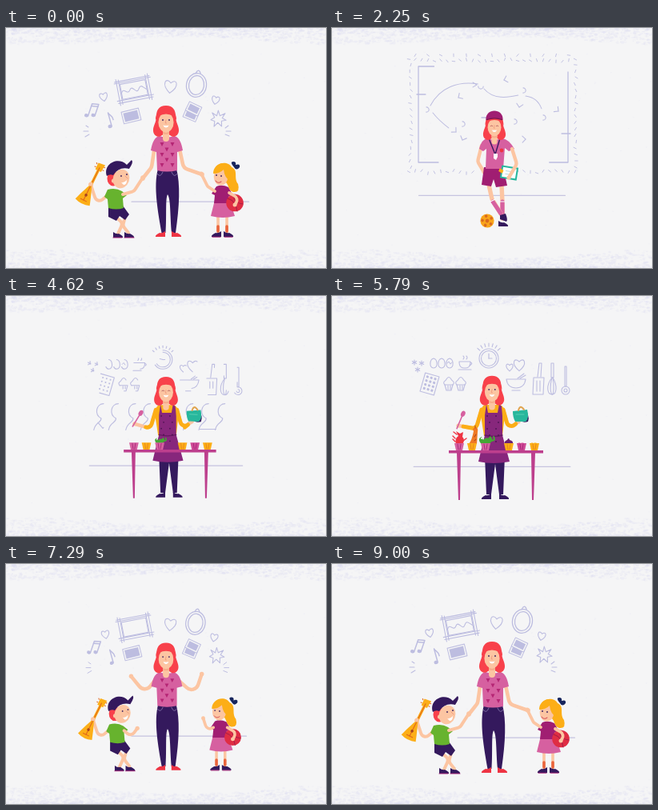
An HTML page with a canvas that plays this animation: 400x300 px, repeating every 9030 ms.

```html
<!DOCTYPE html>
<html lang="en">
<head>
<meta charset="utf-8">
<title>A busy mother</title>
<style>
html, body { margin: 0; width: 100%; height: 100%; overflow: hidden; background: #f5f5f6; }
canvas { display: block; width: 400px; height: 300px; }
</style>
</head>
<body>
<canvas id="stage"></canvas>
<script>
const LOOP = 9030, CUTS = [450, 2400, 4500, 6550];
const INK = '#bdbde0', SKIN = '#fcc5a2', HAIR = '#f8414b', NAVY = '#34195d', PINK = '#d660a0',
  PLUM = '#a01e72', RED = '#ee3343', GOLD = '#fcae17', TEAL = '#27b79c', BG = '#f5f5f6', WHITE = '#fff';
const dpr = window.devicePixelRatio || 1;
const stage = document.getElementById('stage');
const g = stage.getContext('2d');
stage.width = 400 * dpr;
stage.height = 300 * dpr;

const ease = (t, a, b) => { const k = Math.min(1, Math.max(0, (t - a) / (b - a))); return k * k * (3 - 2 * k); };
const span = (t, a, b, c, d) => ease(t, a, b) * (1 - ease(t, c, d));
const mix = (a, b, k) => a + (b - a) * k;
const mixPts = (a, b, k) => a.map((p, i) => [mix(p[0], b[i][0], k), mix(p[1], b[i][1], k)]);
const seeded = s => () => (s = s * 16807 % 2147483647) / 2147483647;

function at(x, y, s, rot, draw) {
  g.save();
  g.translate(x, y);
  g.rotate(rot);
  g.scale(s, s);
  draw();
  g.restore();
}
function fill(d, color) { g.fillStyle = color; g.fill(new Path2D(d)); }
function dot(x, y, rx, color, ry = rx) {
  g.fillStyle = color;
  g.beginPath();
  g.ellipse(x, y, rx, ry, 0, 0, 7);
  g.fill();
}

// Strokes every subpath up to the fraction p of its length.
const probe = document.createElementNS('http://www.w3.org/2000/svg', 'path');
const cache = {};
function line(d, color = INK, w = 1, p = 1) {
  if (p <= 0) return;
  cache[d] ||= d.match(/M[^M]+/g).map(s => {
    probe.setAttribute('d', s);
    return [new Path2D(s), probe.getTotalLength()];
  });
  g.strokeStyle = color;
  g.lineWidth = w;
  for (const [path, len] of cache[d]) {
    g.setLineDash(p < 1 ? [len * p, len + 9] : []);
    g.stroke(path);
  }
  g.setLineDash([]);
}
const icon = (d, x, y, p, s = 1, rot = 0) => at(x, y, s, rot, () => line(d, INK, 1.1 / s, p));

function limb(pts, color, w, hand, bend = 6) {
  const [a, b, c] = pts;
  g.strokeStyle = color;
  g.lineWidth = w;
  g.beginPath();
  g.moveTo(...a);
  g.arcTo(...b, ...c, bend);
  g.lineTo(...c);
  g.stroke();
  if (hand) dot(...c, hand, color);
}

const HEART = 'M0 8C-12-2-6-11 0-4C6-11 12-2 0 8';
const CROSS = 'M-4-4L0 0L4 4M4-4L0 0L-4 4';
const RING = 'M0-3.5A3.5 3.5 0 1 1 0 3.5A3.5 3.5 0 1 1 0-3.5';
const STAR = 'M0-11L2-4L9-7L5-1L10 2L4 3L4 10L-1 5L-6 10L-5 3L-10 1L-5-2L-8-8L-2-4Z';
const SPARK = 'M0-4V4M-3.5-2L3.5 2M-3.5 2L3.5-2';

function note(x, y, s, rot, p, pair) {
  if (p <= 0) return;
  at(x, y, s, rot, () => {
    line(pair ? 'M-2 8V-8L6-10V5M-2-5L6-7' : 'M1 8V-9C2-5 6-4 5 1', INK, 1.5, p);
    if (p < .3) return;
    dot(pair ? -4 : -1, 8, 2.6, INK, 2.2);
    if (pair) dot(4, 5, 2.6, INK, 2.2);
  });
}

function head(x, y, s, shut, cap) {
  at(x, y, s, 0, () => {
    fill('M0-17C-9-17-12-11-12-4C-12 4-16 8-16 14C-16 21-9 24-5 20L0 18L5 20C9 24 16 21 16 14C16 8 12 4 12-4C12-11 9-17 0-17Z', HAIR);
    limb([[0, 9], [0, 15], [0, 24]], SKIN, 8);
    fill('M-4 15Q0 18 4 15V18Q0 20-4 18Z', '#f6ad8c');
    dot(0, 4, 9.6, SKIN, 12.5);
    fill('M-13 1L-9-4Q0-9 9-4L13 1C14-18-14-18-13 1Z', HAIR);
    if (shut) line('M-5.5 2Q-4 .5-2.5 2M2.5 2Q4 .5 5.5 2', '#a44b50', .8);
    else { dot(-4, 1, .9, NAVY); dot(4, 1, .9, NAVY); }
    line('M0 1L-.8 5H.5', '#ed9478', .8);
    fill('M-3.5 7.5Q0 8.5 3.5 7.5Q2.5 10.5 0 10.5T-3.5 7.5Z', WHITE);
    if (cap) {
      fill('M-12-7C-13-24 13-24 12-7Q0-11-12-7Z', PLUM);
      line('M-11-7Q0-11 11-7', '#711551', 1.5);
    }
  });
}
const shoe = (x, y, dir, color) => at(x, y, 1, 0, () =>
  fill(`M${-4 * dir}-5Q0-2 ${3 * dir}-3Q${9 * dir} 0 ${8 * dir} 2H${-4 * dir}Z`, color));

// Slow push-in, pulled back quickly before the sports scene.
const push = t => 1 + 1.95e-5 * (t - 2250);
const zoomAt = t => t < 450 ? mix(push(t + LOOP), push(450), ease(t, 120, 450)) : push(t);
const zoomed = (t, ref, draw) => at(200, 150, zoomAt(t) / push(ref), 0, () => { g.translate(-200, -150); draw(); });

function familyArt(u) {
  const p = span(u, 6600, 7100, 9150, 9450);
  if (!p) return;
  const sway = Math.sin(u / 400) * .04;
  note(107, 103, 1, .35 + sway, p, true);
  note(129, 115, 1, -.25 + sway, p);
  icon(HEART, 122, 86, p, .7, -.2);
  icon(HEART, 205.5, 73, p, 1.05, .12);
  icon(HEART, 262, 90, p, .68, .2);
  icon(STAR, 265.5, 113.5, p, .95, sway);
  at(160, 77.5, 1, -.19, () => {
    line('M-22-14H22M-22 13H22M-20-17V16M20-17V16M-16-10H16V9H-16ZM-23-12H23M-23 10H23M-17-16V15M17-16V15', INK, 1.1, p);
    line('M-16 1C-12-7-9 6-5-1S2 7 6 0S12 0 16 2', INK, 1.1, ease(u, 7500, 8100) * p);
  });
  at(238, 71.5, 1, .15, () => line('M0-15A12.5 15 0 1 1 0 15A12.5 15 0 1 1 0-15M0-12A9.5 12 0 1 1 0 12A9.5 12 0 1 1 0-12M-3-15Q0-22 3-15', INK, 1.3, p));
  const photo = (x, y, w, h, rot) => at(x, y, p, rot, () => {
    g.fillStyle = BG;
    g.fillRect(-w / 2, -h / 2, w, h);
    line(`M${-w / 2} ${-h / 2}h${w}v${h}h${-w}Z`);
    g.fillStyle = INK;
    g.fillRect(-w / 2 + 2, -h / 2 + 2, w - 4, h - 4);
  });
  photo(156.5, 110, 22, 15, -.24);
  photo(231, 109, 17, 11, .4);
  photo(234.5, 101, 17, 12, .45);
  line('M103 124L100 122M103 129H97M104 133L99 136M274 125L278 122M275 129H281M274 133L279 135', INK, 1, p);
}

function kids(u, hold, wave) {
  const k = span(u, 6550, 6850, 9150, 9440);
  if (!k) return;
  at(145, 262, k, 0, () => {
    g.translate(-145, -262);
    limb([[137, 236], [146, 244], [140, 257]], SKIN, 4);
    limb([[149, 236], [146, 247], [153, 256]], SKIN, 4);
    shoe(138, 260, 1, NAVY);
    shoe(152, 260, 1, NAVY);
    line('M134 262H145M148 262H160', PLUM, 1);
    fill('M128 223L146 222L154 233L149 240L142 235L138 241L128 236Z', NAVY);
    limb([[127, 209], [114, 220], [106, 196]], SKIN, 4, 2.8);
    at(101, 207, 1, .46, () => {
      line('M0-12V-32', GOLD, 3.4);
      fill('M-4-41L5-42L4-32H-4Z', GOLD);
      fill('M0-14C4-6 8 6 10 12Q0 16-10 12C-8 6-4-6 0-14Z', GOLD);
      line('M0-36V9M-4 9H4M-5-39L-6-40M-5-35H-6M5-39H6M5-35H6', '#e0661c', 1.1);
      dot(0, 2, 1.8, '#a8431f');
    });
    dot(106, 195, 2.6, SKIN);
    fill('M127 202Q137 199 145 204L151 209L146 213L147 225Q138 228 128 225L127 214L123 211Z', '#67b32e');
    limb(mixPts([[146, 210], [155, 218], [164 + wave, 207]], [[146, 208], [160, 204], [171, 187]], hold), SKIN, 4, 2.7);
    dot(134, 188, 7.5, HAIR, 9.5);
    at(144, 188.5, 1, .35, () => dot(0, 0, 10.2, SKIN, 12));
    dot(134.5, 191, 2.6, SKIN);
    dot(144, 185, .9, NAVY);
    dot(151, 183, .9, NAVY);
    line('M149 185L152 188', '#ed9478', .8);
    fill('M144 193Q148 194 151 190Q151 196 147 196Z', WHITE);
    fill('M126 185C121 170 140 160 151 171L157 165Q160 167 154 176Q141 173 134 184Q130 182 126 185Z', NAVY);
  });
  at(268, 262, k, 0, () => {
    g.translate(-268, -262);
    for (const [x, dir] of [[265, -1], [276, 1]]) {
      limb([[x, 232], [x, 242], [x, 255]], SKIN, 3.6);
      line(`M${x} 248V254`, '#e9643d', 3.6);
      shoe(x, 259, dir, NAVY);
    }
    line('M258 261.2H268M273 261.2H283', PLUM, 1);
    fill('M261 215H279L286 235Q271 239 256 235Z', PINK);
    fill('M263 198Q270 195 278 199L283 208L278 211L280 219H260L261 209L257 207Z', PLUM);
    limb(mixPts([[261, 206], [253, 210], [247 - wave, 194]], [[261, 204], [252, 198], [244, 182]], hold), SKIN, 3.8, 2.5);
    dot(286, 218.5, 10.8, '#df2d44');
    line('M277 213Q287 216 289 229M286 208Q282 218 296 220', '#a51e45', 1);
    limb([[279, 206], [291, 213], [286, 221]], SKIN, 3.8, 2.5);
    fill('M262 178C262 167 278 166 282 174C291 178 284 187 290 195Q293 206 284 205C277 203 279 196 274 192Z', GOLD);
    dot(268.5, 186, 8.8, SKIN, 10.8);
    fill('M259 182C259 170 273 164 281 175L280 191Q273 187 272 177Q267 182 259 182Z', GOLD);
    dot(263, 184, .9, NAVY);
    dot(269, 185, .9, NAVY);
    dot(274, 189, 1.9, SKIN);
    line('M262 191Q265 195 269 192', '#d65258', 1);
    fill('M285 174Q279 167 284 167Q288 167 287 171Q293 169 292 174Q288 179 285 174Z', '#17255d');
  });
}

function family(u, shut) {
  const hold = ease(u, 7700, 8150), wave = Math.sin(u / 110) * 3 * (1 - hold);
  kids(u, hold, wave);
  fill('M190 176H213C218 195 217 222 212 256H207C205 235 206 213 202 208C199 213 201 235 199.5 256H194.5C190 230 184 198 190 176Z', NAVY);
  line('M189 182Q193 188 196 180M207 180Q210 188 214 182', '#8c7bb0', .8);
  shoe(195, 259, -1, RED);
  shoe(211, 259, 1, RED);
  const arm = ease(u, 6550, 6850);
  const left = mixPts([[185, 146], [180, 170], [182, 190]], [[185, 146], [173, 162], [156 + wave, 140]], arm);
  const right = mixPts([[217, 146], [222, 170], [220, 190]], [[217, 146], [237, 164], [247 + wave, 137]], arm);
  limb(mixPts(left, [[186, 147], [182, 174], [171, 188]], hold), SKIN, 4.6, 2.8, 9);
  limb(mixPts(right, [[216, 147], [222, 175], [245, 183]], hold), SKIN, 4.6, 2.8, 9);
  fill('M192 135Q201 138 210 135Q218 136 221 153L214 155L214 178Q201 181 189 178L188 155L181 153Q184 136 192 135Z', PINK);
  for (let i = 0; i < 5; i++)
    for (const x of i % 2 ? [201] : [195, 208]) fill(`M${x - 2.5} ${143 + i * 6.5}h5l-2.5 5Z`, '#b52574');
  head(200, 114, 1, shut);
}

function fieldArt(t) {
  const p = span(t, 500, 950, 2080, 2420), rnd = seeded(31);
  if (!p) return;
  line('M133 168H108V48H295M295 55V168H133M106 83H128M298 132H276M187 112H203', INK, 1.3, p);
  line('M123 97C135 74 158 66 183 70M190 76C202 90 220 87 233 84M242 85Q257 87 262 101M126 106Q134 116 146 125M176 68L181 71L176 74', INK, 1, Math.min(1, p * 2));
  const marks = [[215, 65, 1.3], [158, 87, 1], [283, 104, -.9], [242, 139, -1.6], [163, 140, .4], [234, 99, .2], [155, 130, -.8]];
  for (const [x, y, r] of marks) icon(CROSS, x, y, p, 1, r);
  const rings = [[118, 102], [186, 73], [239, 78], [163, 120], [228, 117], [264, 112]];
  rings.forEach(([x, y], i) => icon(RING, x, y, p, .9, i === 1 ? 1.57 : 0));
  const tick = (x, y) => {
    const a = rnd() * 2.4, l = 1.8 * Math.min(1, p * 2);
    line(`M${x - l * Math.cos(a)} ${y - l * Math.sin(a)}L${x + l * Math.cos(a)} ${y + l * Math.sin(a)}`, INK, .9);
  };
  for (let i = 0; i < 27; i++) {
    const x = 96 + i * 8;
    tick(x, 39 + rnd() * 3);
    if (i & 1) tick(x, 34);
    if (Math.abs(x - 202) > 22) tick(x, 178 + rnd() * 4);
    if (i < 17) { tick(97 + rnd() * 3, 46 + x - 96); tick(303 + rnd() * 3, 46 + x - 96); }
  }
}

function coach(t, shut) {
  const roll = ease(t, 480, 1050);
  at(mix(130, 194, roll), 241 - Math.abs(Math.sin(roll * 9.42)) * 8 * (1 - roll), 1, roll * 7, () => {
    dot(0, 0, 8.6, '#f9a51b');
    for (let i = 0; i < 5; i++) dot(6 * Math.cos(i * 1.257), 6 * Math.sin(i * 1.257), 1.8, '#d86920');
    dot(0, 0, 2.3, '#d86920');
  });
  limb([[212, 196], [213, 218], [213, 238]], SKIN, 5.4);
  line('M213 217V237', PINK, 5.2);
  limb([[196, 196], [200, 214], [211, 232]], SKIN, 5.4);
  line('M201 217L211 232', PINK, 5);
  line('M198 217L204 214M210 217H216', WHITE, 1);
  fill('M210 234L217 232Q220 240 218 242L210 239Z', NAVY);
  shoe(212, 246, 1, NAVY);
  const a = ease(t, 450, 800);
  limb(mixPts([[187, 147], [183, 166], [184, 183]], [[187, 147], [182, 167], [190, 180]], a), SKIN, 4.4, 2.5);
  fill('M190 174H214L219 197L205 199L202 189L199 198L187 196Z', PLUM);
  fill('M194 138Q203 141 213 138Q221 139 228 151L221 154L216 150L214 176H192L193 151L189 154L184 151Q187 139 194 138Z', PINK);
  line('M196 138L204 158L210 138', NAVY, 1.3);
  fill('M202 157H207V161L205 165L202 163Z', WHITE);
  dot(212, 153, 2.4, RED);
  at(221, 181, a, .16, () => {
    fill('M-10-8H11V8H-10Z', TEAL);
    fill('M-8-6H9V6H-8Z', WHITE);
    line('M-4-2H6M-4 2H4', '#bad9dc', 1);
    fill('M-12-4L-7-2L-8 2L-13 0Z', GOLD);
  });
  limb(mixPts([[224, 150], [228, 166], [222, 184]], [[225, 151], [231, 170], [221, 187]], a), SKIN, 4.4, 2.6);
  head(203, 120.5 + Math.sin(t / 260) * .4, .88, shut, true);
}

function musicArt(t) {
  const p = span(t, 2450, 2900, 4150, 4450), q = span(t, 2450, 2950, 4420, 4820);
  const bob = i => Math.sin((t - 3300) / 180 + i * 2) * 1.2;
  const notes = [[168, 86, .2], [184, 96, 0], [145, 102, .15], [239, 90, -.2], [249, 110, .1]];
  notes.forEach(([x, y, r], i) => note(x, y + bob(i), .85, r, p));
  note(213, 88 + bob(5), 1, .3, p, true);
  note(264, 83 + bob(6), .85, .1, p, true);
  icon('M0 12C4 14 4 8 2 4L-1-8C-1-14 4-12 2-8C0-4-5-1-5 3C-5 8 4 8 4 3C4-1-2-1-1 4', 127, 90, p);
  icon('M-1-4L-2 4M2-4L1 4M-4-1H4M-4 2H4', 144, 82, p);
  [[197, 83, 1.2], [225, 107, 1], [266, 101, 1.1], [249, 77, .8]].forEach(([x, y, s]) => icon(SPARK, x, y, p, s));
  for (let i = 0; i < 10; i++) at(165, 106, 1, i * .628, () => line('M0-5V-7', INK, 1, p));
  for (const x of [124, 142, 163, 181, 233, 252, 272])
    icon('M-12 25C-10 15-3 17-3 11C-12 6-9-7 0-7C9-7 12 6 3 11C3 17 10 15 12 25', x, 142, q);
  line('M117 158L123 165L131 156M241 166H281', INK, 1, q);
}

function singer(t, shut) {
  const a = ease(t, 2400, 2750), bob = Math.sin((t - 3300) / 180) * a;
  limb([[196, 202], [196, 225], [195, 246]], SKIN, 5.2);
  limb([[209, 202], [210, 225], [211, 246]], SKIN, 5.2);
  shoe(195, 250, -1, NAVY);
  shoe(212, 250, 1, NAVY);
  limb(mixPts([[188, 145], [184, 162], [186, 182]], [[189, 146], [172, 151], [168, 134 + bob]], a), SKIN, 4.4, 2.6);
  at(173, 129 + bob, a, 0, () => {
    fill('M-5-5H9V4H-5Z', NAVY);
    fill('M-10-3H-4V2H-10Z', '#4c3b78');
    line('M-4 4Q2 8 6 4', SKIN, 3);
    dot(-1, 0, 2, '#a7a0c8');
  });
  fill('M190 174H213L219 204Q202 207 184 204Z', NAVY);
  limb(mixPts([[213, 146], [217, 164], [215, 182]], [[213, 146], [218, 168], [230, 159 + bob]], a), SKIN, 4.4, 2.6);
  fill('M191 137H211Q216 138 217 148L213 151V176H190V151L186 148Q186 139 191 137Z', PINK);
  for (let y = 146; y < 174; y += 7) { dot(201, y, .8, PLUM); dot(195, y + 2, .6, '#a03b84'); dot(208, y + 2, .6, '#a03b84'); }
  line('M207 140Q194 139 191 150L188 178', NAVY, 1.5);
  fill('M184 176L192 175L193 191L184 192Z', '#f2681f');
  line('M184 181H193', '#b93d18', 1);
  at(231, 147 + bob, a, .16, () => {
    fill('M-9-10L6-11V12L-9 11Z', GOLD);
    fill('M6-11L10-16L11 7L6 12Z', '#ee8f18');
    line('M-5-3H2M-5 0H2M-3 6V1L2 0V5', '#c66b16', 1);
  });
  dot(228, 160 + bob, 2.5, SKIN);
  head(199, 119 + bob * .4, .9, shut);
  fill('M201 138L194 136L192 143L198 146ZM201 138L208 136L210 143L204 146Z', WHITE);
}

function kitchenArt(t) {
  const p = span(t, 4350, 4800, 6250, 6590);
  if (!p) return;
  [[103, 83], [112, 84], [107, 92]].forEach(([x, y]) => icon(SPARK, x, y, p, .75));
  for (const x of [127, 137, 147]) icon('M0-6C5-5 6 6 0 6S-5-5 0-6', x, 84, p);
  line('M144 84L146 82L148 85L150 83', INK, 1, p);
  icon('M-7-3H7C7 4 4 5 0 5S-7 4-7-3M7-2Q11-1 6 2M-8 7H8M-2-6Q0-8-2-10M2-6Q4-8 2-10', 166, 85, p);
  icon('M0-12A12 12 0 1 1 0 12A12 12 0 1 1 0-12M0-9.5A9.5 9.5 0 1 1 0 9.5A9.5 9.5 0 1 1 0-9.5', 196, 78, p);
  at(196, 78, 1, 0, () => {
    const a = (t - 5790) / 900;
    line('M0 0H4', INK, 1.2, p);
    line(`M0 0L${6 * Math.sin(a)} ${-6 * Math.cos(a)}`, INK, 1.2, p);
  });
  for (let i = -3; i < 4; i++) at(196, 78, 1, i * .28, () => line('M0-15V-19', INK, 1.1, p));
  icon(HEART, 222, 89, p, .6);
  icon(HEART, 234, 86, p, .95);
  icon('M-12-3H12C11 5 7 8 0 8S-11 5-12-3M-5 11H5M2-4L10-10M5-4L12-8', 230, 107, p);
  icon('M-6-1H7L6 20H-7ZM-2 3V16M2 3V16M-1-2L1-19H4L3-2', 258, 103, p);
  icon('M-1-20H2V-2H-1ZM0-2C-8 8-6 19 0 19S7 8 1-2M0-2C-3 8-2 17 0 19S3 8 1-2', 275, 104, p);
  icon('M-1-17H1V8H-1ZM0 8A5 5 0 1 1 0 18A5 5 0 1 1 0 8M0 11A2 2 0 1 1 0 15A2 2 0 1 1 0 11', 292, 105, p);
  at(122, 110, 1, .28, () => {
    line('M-9-12H9V12H-9Z', INK, 1.1, p);
    for (let i = 0; i < 12; i++) dot(-5 + i % 3 * 5, -8 + (i / 3 | 0) * 5, 1.6 * p, INK);
  });
  for (const x of [146, 161])
    icon('M-5 1H5L3 8H-3ZM-5 1C-9-3-3-4-3-6Q0-11 3-6C3-4 9-3 5 1M-1 2V7M2 2V7', x, 110, p);
}

const TOPS = [
  () => { fill('M-4 0Q-6-7-1-10L-4-16L1-13L5-15L4-9Q8-5 4 0Z', RED); line('M-5-3L-8-6M-5-7L-8-10M5-4L9-7M-3-12L-7-15', RED, 1.4); },
  () => { fill('M-4 0Q0-5 2-16Q-1-20 5-21Q8-20 7-15L6 0Z', '#ef7a24'); line('M4-20V-23M5-12L3-9M5-6L3-4', '#ad421b', 1); },
  () => { fill('M-7-2Q-10-7-5-9L-3-5Q0-9 3-7L6-10L9-5L5 0H-5Z', '#46a735'); dot(-5, -7, 1, WHITE); line('M7-4Q13-4 10-9', '#46a735', 2); },
  () => fill('M-5 0Q-6-4-2-5Q0-9 1-5Q6-4 5 0Z', '#6b2172'),
  () => fill('M-5 0Q-4-3-1-1Q1-3 5 0Z', '#df6aa4'),
  () => fill('M-5 0Q-4-3-1-1Q1-3 5 0Z', '#fbc13a')
];
const READY = [5000, 4700, 4350, 5100, 4500, 4500];

function cook(t, shut) {
  const a = ease(t, 4420, 4600), beat = Math.cos((t - 4620) / 372), sleeve = mix(.25, .72, ease(t, 4650, 4850));
  fill('M191 200H216L214 248H209L204 210L199 248H193Z', NAVY);
  shoe(195, 252, -1, NAVY);
  shoe(213, 252, 1, NAVY);
  const left = mixPts([[187, 143], [182, 162], [184, 180]], [[187, 142], [180, 166], [159 + beat, 161 - beat]], a);
  const right = mixPts([[214, 143], [219, 162], [216, 180]], [[214, 142], [221, 167], [233, 157]], a);
  for (const [shoulder, elbow, hand] of [left, right]) {
    limb([shoulder, elbow, hand], SKIN, 4.6, 2.6);
    limb([shoulder, elbow, mixPts([elbow], [hand], sleeve)[0]], GOLD, 5);
  }
  fill('M191 136H210Q216 138 216 149L213 175H190L186 149Q186 138 191 136Z', GOLD);
  fill('M193 135L195 146H207L209 135L212 138L213 150V174L222 207Q202 211 183 207L191 174V149Z', '#87277c');
  line('M191 174Q202 177 213 174', '#641861', 1.3);
  for (let i = 0; i < 10; i++) dot(196 + i % 2 * 11 + (i / 2 & 1) * 3 - 2, 150 + (i / 2 | 0) * 8, .9, '#4d1552');
  head(200, 116, .95, shut);
  at(159 + beat, 160 - beat, a, .475 + .075 * beat, () => {
    line('M0 5V-13', PINK, 1.6);
    dot(0, -15, 2.7, PINK, 3.8);
  });
  at(236, 150, a, Math.sin((t - 5790) / 300) * .07, () => {
    fill('M4-6Q12-2 9 7Q2 9-1 5Z', NAVY);
    fill('M-10-6L8-8Q11 3 6 7H-7Q-10 2-10-6Z', TEAL);
    line('M-3-7Q-1-15 4-8', '#e0a44f', 2);
    line('M-6-2H4', '#57cfb4', 1);
  });
  fill('M146 193H264V196.5H146Z', '#bd3f8d');
  fill('M156 196H161L160 255H158ZM249 196H254L252 255H250Z', '#bd3f8d');
  [159, 175, 192, 221, 237, 253].forEach((x, i) => at(x, 193, 1, 0, () => {
    at(0, -8, ease(t, READY[i], READY[i] + 400), 0, TOPS[i]);
    fill('M-6-9H6L4 0H-4Z', [PINK, GOLD, PINK, GOLD, '#cf4a97', GOLD][i]);
    line('M-2-8L-1-1M2-8L1-1', i % 2 ? '#e47e1b' : PLUM, .8);
  }));
}

// Paper with faint brushed edges.
const paper = document.createElement('canvas');
paper.width = 400;
paper.height = 300;
(() => {
  const b = paper.getContext('2d'), rnd = seeded(77);
  b.fillStyle = BG;
  b.fillRect(0, 0, 400, 300);
  b.fillStyle = '#dedef2';
  for (let i = 0; i < 2600; i++) {
    const x = rnd() * 400, depth = rnd() ** 1.7 * (16 + 5 * Math.sin(x / 60 + 1));
    b.globalAlpha = .1 + rnd() * .25;
    b.beginPath();
    b.ellipse(x, i % 2 ? depth : 300 - depth * 1.1, .6 + rnd() * 2.6, .5 + rnd(), 0, 0, 7);
    b.fill();
  }
  for (let i = 0; i < 90; i++) {
    b.globalAlpha = .25;
    b.fillRect(rnd() * 400, rnd() * 300, 1 + rnd(), 1);
  }
})();

function frame(now) {
  const t = now % LOOP, u = t < 3000 ? t + LOOP : t;
  const shut = CUTS.some(c => Math.abs(t - c) < 160);
  const scene = CUTS.filter(c => t >= c).length % 4;
  g.setTransform(dpr, 0, 0, dpr, 0, 0);
  g.lineCap = g.lineJoin = 'round';
  g.drawImage(paper, 0, 0, 400, 300);
  zoomed(t, 9000, () => familyArt(u));
  zoomed(t, 2250, () => fieldArt(t));
  zoomed(t, 3300, () => musicArt(t));
  zoomed(t, 5790, () => kitchenArt(t));
  const z = zoomAt(t), y = 150 + 59.3 * z;
  const start = mix(200 - 91.5 * z, 157, span(u, 6550, 6900, 9150, 9450));
  line(`M${start} ${y}H${200 + 91.5 * z}`, '#c6c4df', 1.2);
  const [ref, draw] = [[9000, () => family(u, shut)], [2250, () => coach(t, shut)],
    [3300, () => singer(t, shut)], [5790, () => cook(t, shut)]][scene];
  zoomed(t, ref, draw);
  requestAnimationFrame(frame);
}
requestAnimationFrame(frame);
</script>
</body>
</html>
```
